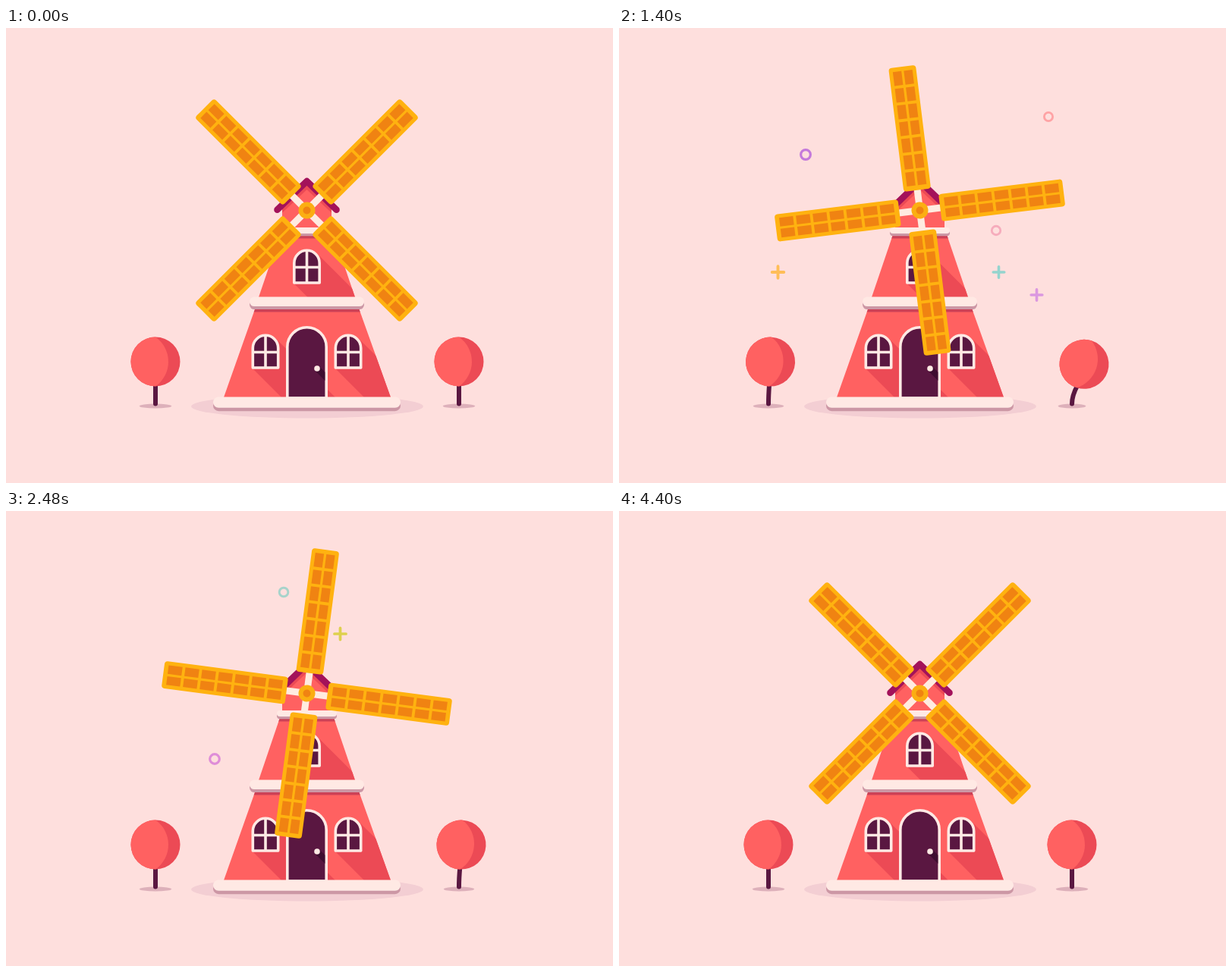
These frames come from a looping animation (800 px wide and 600 px high, 4.8 s). An HTML page:

```html
<!DOCTYPE html>
<html lang="en">
<head>
<meta charset="utf-8">
<title>Windmill</title>
<style>
  html, body { margin: 0; width: 100%; height: 100%; overflow: hidden; background: #fedfdd; }
  svg { display: block; width: 800px; height: 600px; }
  .wall { fill: #ff6161; }
  .shade { fill: #ec4a55; }
  .stripe { fill: #cc4156; }
  .cream { fill: #ffe9e4; }
  .under { fill: #cc97a5; }
  .dark { fill: #5a1741; }
  .frame { fill: #5a1741; stroke: #ffe9e4; stroke-width: 3.6; stroke-linejoin: round; }
  .bars { fill: none; stroke: #ffe9e4; stroke-width: 3.6; }
  .trunk { fill: none; stroke: #5a1741; stroke-width: 6; stroke-linecap: round; }
  .bit { fill: none; stroke-width: 3; stroke-linecap: round; }
</style>
</head>
<body>
<svg viewBox="0 0 800 600">
  <defs>
    <clipPath id="lower"><path d="M328 371H465.5L507 487H287Z"/></clipPath>
    <clipPath id="upper"><path d="M360.5 274H432.5L460 355H333Z"/></clipPath>
    <clipPath id="head"><path d="M364 264V233L396.5 204L429 233V264Z"/></clipPath>
    <g id="window">
      <path class="frame" d="M-16.7 26V0A16.7 16.7 0 0 1 16.7 0V26Z"/>
      <path class="bars" d="M0-16V26M-16 5.5H16"/>
    </g>
    <path id="cast" class="shade" d="M-18.5 27L13.1-13.1L113 87V158.500H113Z"/>
    <g id="ledge">
      <rect class="under" y="4" width="100%" height="14" rx="7"/>
    </g>
    <g id="tree">
      <circle class="shade" r="32.5"/>
      <path class="wall" d="M0-32.500A32.500 32.500 0 0 0 0 32.500A39.600 39.600 0 0 0 0-32.500Z"/>
    </g>
    <g id="blade"></g>
  </defs>

  <ellipse cx="397" cy="499" rx="153" ry="15.500" fill="#f3ced3"/>
  <g id="trees"></g>
  <g id="bits"></g>

  <g clip-path="url(#lower)">
    <rect class="wall" x="280" y="370" width="235" height="118"/>
    <path class="shade" d="M323.500 447.500L355.100 408.900L434 487H363Z"/>
    <path class="shade" d="M432.500 447.500L464.100 408.900L543 487H472Z"/>
    <rect class="stripe" x="320" y="370" width="155" height="4.500"/>
  </g>
  <g clip-path="url(#upper)">
    <rect class="wall" x="330" y="273" width="135" height="83"/>
    <path class="shade" d="M378 335.500L409.600 296.900L480 367.300H410Z"/>
    <rect class="stripe" x="350" y="273" width="95" height="4.500"/>
  </g>
  <g clip-path="url(#head)">
    <rect class="wall" x="360" y="200" width="75" height="66"/>
    <path d="M355 246L396.500 207L438 246" fill="none" stroke="#ec4a55" stroke-width="9"/>
  </g>
  <path d="M357.500 239.700L396.500 202L435.500 239.700" fill="none" stroke="#a3125a" stroke-width="8.600" stroke-linecap="round" stroke-linejoin="round"/>

  <use href="#window" x="396.500" y="310"/>
  <use href="#window" x="342" y="422"/>
  <use href="#window" x="451" y="422"/>

  <path class="frame" d="M370.800 488V420.500A25.700 25.700 0 0 1 422.200 420.500V488Z"/>
  <path d="M412.800 446.200L420.400 453.800V465L407.200 451.800Z" fill="#3f0d30"/>
  <circle class="cream" cx="410" cy="449" r="3.800"/>

  <g id="ledges"></g>
  <g id="sails"></g>
</svg>
<script>
const LOOP = 4800, STEP = 40;
const $ = id => document.getElementById(id);

function add(parent, tag, attrs) {
  const el = document.createElementNS('http://www.w3.org/2000/svg', tag);
  for (const key in attrs) el.setAttribute(key, attrs[key]);
  return parent.appendChild(el);
}

// Smooth curve through [time, value] points, flat at the ends and turning points
function track(points) {
  const seg = points.slice(1).map(([t, v], i) => {
    const h = t - points[i][0];
    return { h, d: (v - points[i][1]) / h };
  });
  const slopes = points.map((_, i) => {
    const a = seg[i - 1], b = seg[i];
    if (!a || !b || a.d * b.d <= 0) return 0;
    const m = (a.h * b.d + b.h * a.d) / (a.h + b.h);
    return Math.sign(m) * Math.min(Math.abs(m), 3 * Math.abs(a.d), 3 * Math.abs(b.d));
  });
  return t => {
    if (t <= points[0][0]) return points[0][1];
    const i = points.findIndex(p => p[0] > t) - 1;
    if (i < 0) return points[points.length - 1][1];
    const { h } = seg[i], s = (t - points[i][0]) / h, r = 1 - s;
    return r * r * (1 + 2 * s) * points[i][1] + s * s * (3 - 2 * s) * points[i + 1][1]
      + h * s * r * (r * slopes[i] - s * slopes[i + 1]);
  };
}

const turn = track([[120, 0], [680, 7.2], [960, 22.4], [1440, 55], [1840, 86.6],
  [2480, 127.5], [3120, 155.9], [3760, 174.1], [4400, 180]]);
const sway = track([[380, 0], [600, 4.5], [880, 13], [960, 15.2], [1040, 16],
  [1480, 0], [1820, -3.7], [2120, 3], [2500, 0]]);

// Ledges: x, y, width, height, depth of the underside
for (const [x, y, width, height, depth] of [
  [273, 486.5, 247, 14.3, 4.4], [321, 354.5, 151, 12.6, 4], [357, 263, 79, 8, 3.2]
]) {
  const box = { x, width, height, rx: height / 2 };
  add($('ledges'), 'rect', { ...box, class: 'under', y: y + depth });
  add($('ledges'), 'rect', { ...box, class: 'cream', y });
}

// Sails
const blade = $('blade');
add(blade, 'rect', { x: -4.5, y: -40, width: 9, height: 40, fill: '#ffebe0' });
add(blade, 'rect', { x: -18, y: -191, width: 36, height: 164, rx: 4, fill: '#ffb210' });
for (let row = 0; row < 7; row++)
  for (const x of [-13, 1.6])
    add(blade, 'rect', { x, y: -185.3 + row * 22.25, width: 11.4, height: 18.4, fill: '#f08312' });
const sails = $('sails');
for (let i = 0; i < 4; i++) add(sails, 'use', { href: '#blade', transform: `rotate(${45 + i * 90})` });
add(sails, 'circle', { r: 11, fill: '#fbae12' });
add(sails, 'circle', { r: 5, fill: '#f08312' });

// Trees
const trees = [[197, 0], [597, 360]].map(([x, delay]) => {
  const g = add($('trees'), 'g', { transform: `translate(${x} 0)` });
  return {
    delay,
    shadow: add(g, 'ellipse', { cy: 498.5, ry: 3, fill: '#ddb0ba' }),
    trunk: add(g, 'path', { class: 'trunk' }),
    crown: add(g, 'use', { href: '#tree' })
  };
});

function poseTree({ delay, shadow, trunk, crown }, t) {
  const lean = sway(t - delay), tilt = lean * 1.1, a = tilt * Math.PI / 180;
  const y = 440 + 0.013 * lean * lean;
  shadow.setAttribute('rx', 21.3 - 2.8 * (Math.abs(lean) / 15) ** 0.6);
  trunk.setAttribute('d', `M0 495.5Q0 485 ${lean - 30 * Math.sin(a)} ${y + 30 * Math.cos(a)}`);
  crown.setAttribute('transform', `translate(${lean} ${y}) rotate(${tilt})`);
}

// Floating bits: shape, x, y, colour, start time
const LIFE = 1300;
const bits = [
  ['ring', 566, 117, '#ff8688', 500],
  ['ring', 497, 267, '#f29ab0', 560],
  ['plus', 500.5, 322, '#80d2cb', 700],
  ['plus', 550.5, 352, '#d68de0', 740],
  ['ring', 246, 167, '#c377da', 1080],
  ['plus', 209.5, 322, '#ffbd55', 1120],
  ['ring', 366, 107, '#8fd0c5', 1700],
  ['plus', 440.5, 162, '#dccf45', 1980],
  ['ring', 275, 327, '#de8bd8', 2090],
  ['plus', 260.5, 122, '#f5a196', 2920]
].map(([shape, x, y, stroke, start]) => ({
  x, y, start,
  el: shape === 'ring'
    ? add($('bits'), 'circle', { class: 'bit', r: 6, stroke })
    : add($('bits'), 'path', { class: 'bit', d: 'M-7.300 0H7.300M0-7.300V7.300', stroke, style: 'stroke-width:3.6' })
}));

function poseBit({ x, y, start, el }, t) {
  const age = (t - start) / LIFE;
  const alive = age > 0 && age < 1;
  el.style.display = alive ? '' : 'none';
  if (!alive) return;
  const pop = 1 - (1 - Math.min(1, age * 8)) ** 3;
  el.setAttribute('transform', `translate(${x} ${y}) scale(${pop * (1.08 - 0.3 * age * age)})`);
  el.setAttribute('opacity', 1 - age ** 3);
}

const origin = performance.now();
function draw() {
  const t = Math.floor((performance.now() - origin) % LOOP / STEP) * STEP;
  sails.setAttribute('transform', `translate(396.5 240.5) rotate(${-turn(t)})`);
  trees.forEach(tree => poseTree(tree, t));
  bits.forEach(bit => poseBit(bit, t));
  requestAnimationFrame(draw);
}
draw();
</script>
</body>
</html>
```
